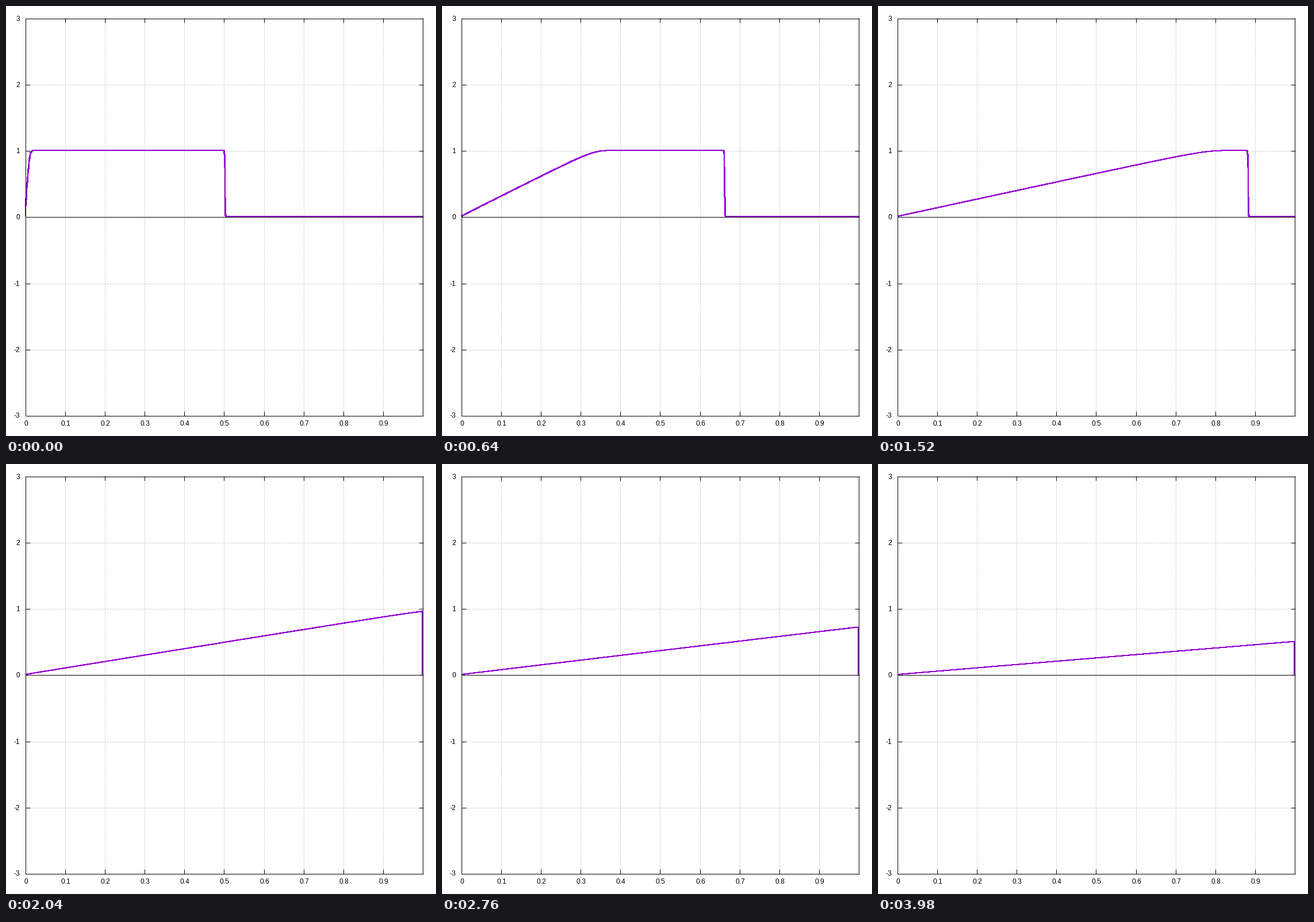
A matplotlib script that plays this animation: 748x748 px, repeating every 4 s.

```python
import numpy as np
import matplotlib.pyplot as plt
from matplotlib.animation import FuncAnimation

SIZE, DPI = 748, 100
PX = 72 / DPI                                # one pixel in points
LEFT, RIGHT, TOP, BOTTOM = 34, 725, 21, 712
FRAMES, INTERVAL = 200, 20

# Inviscid Burgers equation, first-order upwind scheme
CELLS, DX, DT, SUBSTEPS = 1000, 1e-3, 1e-4, 100

plt.rcParams["path.simplify"] = False
plt.rcParams["font.family"] = "Liberation Sans"


def solve():
    u = np.zeros(CELLS)
    u[1:498] = 1.0
    states = []
    for _ in range(FRAMES):
        for _ in range(SUBSTEPS):
            u[1:-1] -= DT / (2 * DX) * np.diff(u[:-1] ** 2)
        states.append(u.copy())
    return states


def to_x(x):
    return np.floor(LEFT + (RIGHT - LEFT) * x / 0.999 + 1e-6)


def to_y(u):
    return np.floor(366.8 - (BOTTOM - TOP) / 6 * u)


fig = plt.figure(figsize=(SIZE / DPI, SIZE / DPI), dpi=DPI, facecolor="white")
ax = fig.add_axes([0, 0, 1, 1])
ax.set_xlim(0, SIZE)
ax.set_ylim(SIZE, 0)
ax.axis("off")


def stroke(x0, y0, x1, y1, color="black", z=1, style="-"):
    """One pixel wide line along pixel centres."""
    ax.plot([x0, x1], [y0, y1], color=color, lw=PX, ls=style, zorder=z,
            solid_capstyle="butt", dash_capstyle="butt")


def label(x, y, text, align):
    ax.text(x, y, text, ha=align, va="baseline", fontsize=12 * PX)


GRID = dict(color="#a0a0a0", style=(0, (1, 2)))
TICK = 8

for k in range(10):
    x = to_x(k / 10) + 0.5
    if k:
        stroke(x, BOTTOM + 1, x, TOP, **GRID)
        stroke(x, TOP, x, TOP + TICK, z=4)
        stroke(x, BOTTOM + 1, x, BOTTOM + 1 - TICK, z=4)
    label(x, 730.5, f"{k / 10:g}", "center")

for v in range(-3, 4):
    y = np.round(366.49 - (BOTTOM - TOP) / 6 * v) + 0.5
    if abs(v) < 3:
        if v:
            stroke(LEFT, y, RIGHT + 1, y, **GRID)
        stroke(LEFT, y, LEFT + TICK, y, z=4)
        stroke(RIGHT + 1, y, RIGHT + 1 - TICK, y, z=4)
    label(24.3, y + 4, str(v), "right")

stroke(LEFT, 366.5, RIGHT + 1, 366.5, z=2)
for x in (LEFT + 0.5, RIGHT + 0.5):
    stroke(x, TOP, x, BOTTOM + 1, z=4)
for y in (TOP + 0.5, BOTTOM + 0.5):
    stroke(LEFT, y, RIGHT + 1, y, z=4)

states = solve()
xs = to_x(np.arange(CELLS) * DX)
curve, = ax.plot(xs, to_y(states[0]), color="#9400d3", lw=2 * PX, zorder=3,
                 antialiased=False, snap=False,
                 solid_joinstyle="round", solid_capstyle="butt")


def update(i):
    curve.set_ydata(to_y(states[i]))
    return curve,


anim = FuncAnimation(fig, update, frames=FRAMES, interval=INTERVAL,
                     repeat=True, repeat_delay=0, blit=False)
plt.show()
```
